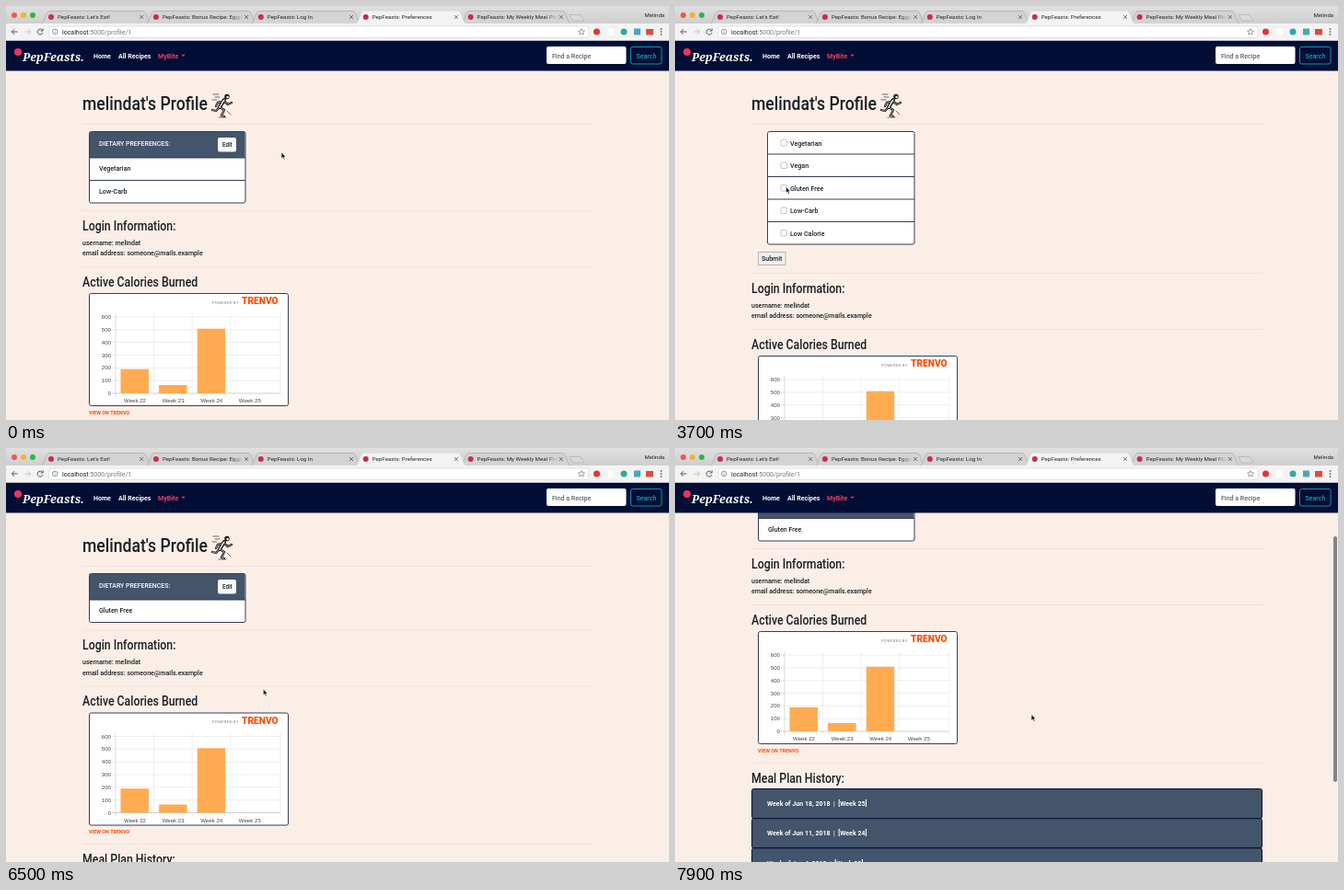
Animation, 720 px wide and 450 px high, one loop 8 s. Source, as an HTML page:

```html
<!DOCTYPE html>
<html lang="en">
<head>
<meta charset="utf-8">
<title>Profile page</title>
<style>
html, body { margin: 0; width: 100%; height: 100%; overflow: hidden; background: #faeee7; }
svg { display: block; }
text { font-family: Roboto, sans-serif; white-space: pre; }
.axes text { font-family: "Liberation Sans", sans-serif; }
.script { font: italic 600 12.5px "Noto Serif", serif; }
</style>
</head>
<body>
<svg id="stage" width="720" height="450" viewBox="0 0 720 450"></svg>
<script>
const INK = '#1b1f23', SLATE = '#44546a', NAVY = '#020e35', EDGE = '#343f52', ORANGE = '#fc4c02';
const BRAND = 'PepFeasts', USER = 'melindat';
const bold = 'font-weight="700"', medium = 'font-weight="500"';
const outline = `stroke="${EDGE}" rx="2"`;

const text = (x, y, size, str, fill = INK, extra = '') =>
  `<text x="${x}" y="${y}" font-size="${size}" fill="${fill}" ${extra}>${str}</text>`;
// The page's face is a condensed cut, so the whole face shares one ratio.
const cond = (x, y, size, str, fill = INK, extra = medium) =>
  `<g transform="translate(${x} ${y}) scale(.88 1)">${text(0, 0, size, str, fill, extra)}</g>`;
const rect = (x, y, w, h, fill, extra = '') =>
  `<rect x="${x}" y="${y}" width="${w}" height="${h}" fill="${fill}" ${extra}/>`;
const path = (d, stroke, width = 1, fill = 'none') =>
  `<path d="${d}" stroke="${stroke}" stroke-width="${width}" fill="${fill}"/>`;
const dot = (x, y, r, fill) => `<circle cx="${x}" cy="${y}" r="${r}" fill="${fill}"/>`;
const rule = y => path(`M83 ${y}H638`, '#f0e2da');

function runner() {
  const limbs = 'M236 103L232 110L237 113L234 119L237 120M232 110L228 114L224 113M236 103L241 107L245 105M235 104L230 105L228 109';
  const body = 'M237 102L232 110';
  return `<g stroke-linecap="round" stroke-linejoin="round">
    ${path(limbs, '#111', 2.3)}${path(body, '#111', 4)}
    ${path(limbs, '#faeee7', .6)}${path(body, '#faeee7', 1.4)}
    ${path('M225 96H231M227 99H232M224 102H229M240 114L244 118M231 121H239', '#333', .7)}</g>` +
    dot(240, 98.5, 2.7, '#111') + dot(240.6, 99, 1.3, '#faeee7');
}

function prefsCard(items) {
  const rows = items.map((name, i) =>
    (i ? path(`M90.5 ${165 + i * 24.5}H260`, EDGE) : '') + cond(101, 179.2 + i * 24.5, 8.1, name));
  return rect(90.5, 136.5, 169.5, 28.5 + items.length * 24.5, '#fff', outline) +
    rect(91, 137, 168.5, 28, SLATE) + path('M90.5 165H260', EDGE) +
    cond(101, 151.5, 7.9, 'DIETARY PREFERENCES:', '#fff') +
    rect(230, 143, 20, 15.5, '#f8f9fa', 'rx="2"') + cond(235, 153.3, 7, 'Edit') +
    rows.join('');
}

function prefsForm() {
  const rows = ['Vegetarian', 'Vegan', 'Gluten Free', 'Low-Carb', 'Low Calorie'].map((name, i) => {
    const y = 136.5 + i * 24.5;
    return (i ? path(`M100.5 ${y}H260`, EDGE) : '') +
      rect(115, y + 9, 6.5, 6.5, '#fff', 'stroke="#b5b5b5" stroke-width=".8" rx="1.2"') +
      cond(125, y + 15.2, 8.1, name);
  });
  return rect(100.5, 136.5, 159.5, 122.5, '#fff', outline) + rows.join('') +
    `<g id="tick">${rect(114.7, 194.5, 7.2, 7.2, '#1a7fe0', 'rx="1.3"')}
      ${path('M116.3 198.2L117.8 199.8L120.4 196.2', '#fff', 1.1)}</g>` +
    rect(90.5, 267.5, 29.5, 14, '#efefef', 'stroke="#a9a9a9" stroke-width=".8"') +
    cond(94, 277.3, 8, 'Submit');
}

function chart() {
  const y = v => 421 - v * 83 / 600, step = 41.6;
  let axes = '';
  for (let v = 0; v <= 600; v += 100)
    axes += path(`M115 ${y(v)}H298`, v ? '#e8e8e8' : '#bbb', .7) +
      text(114, y(v) + 2.1, 6.1, v, '#444', 'text-anchor="end"');
  for (const x of [119, 119 + step, 119 + 2 * step, 119 + 3 * step, 298])
    axes += path(`M${x} 334V425`, x === 119 ? '#ccc' : '#e8e8e8', .7);
  [190, 65, 508, 0].forEach((v, i) => {
    const x = 119 + i * step;
    axes += rect(x + 5.5, y(v), 30.5, 421 - y(v), '#ffab52') +
      text(x + 21, 431.4, 6.1, 'Week ' + (22 + i), '#444', 'text-anchor="middle"');
  });
  return rect(90.5, 312.5, 216, 122, '#fff', outline) +
    text(224, 323.5, 4, 'POWERED BY', '#777', 'letter-spacing=".45"') +
    text(256, 324, 10.2, 'TRENVO', ORANGE, 'font-weight="900"') +
    `<g class="axes">${axes}</g>`;
}

function details() {
  const weeks = ['18', '11', '4'].map((day, i) => {
    const y = 483.5 + i * 32.2;
    return rect(83.5, y, 554, 32.2, SLATE, `stroke="${NAVY}" rx="2"`) +
      cond(100, y + 18.7, 8, `Week of Jun ${day}, 2018  |  [Week ${25 - i}]`, '#fff', bold);
  });
  return rule(222.5) + cond(83, 243.5, 14, 'Login Information:') +
    cond(83, 259.5, 8.1, 'username: ' + USER) +
    cond(83, 271.4, 8.1, 'email address: someone@mails.example') +
    rule(283.5) + cond(83, 304.5, 14, 'Active Calories Burned') + chart() +
    cond(90, 443.5, 6.2, 'VIEW ON TRENVO', ORANGE, bold) +
    rule(455) + cond(83, 476.5, 14, 'Meal Plan History:') + weeks.join('');
}

function browser() {
  const tabs = ["Let's Eat!", 'Bonus Recipe: Eggplant', 'Log In', 'Preferences', 'My Weekly Meal Plans'];
  const tab = i => {
    const x = 38 + 113.9 * i, on = i === 3, fill = on ? '#f3f3f3' : '#d3d3d3';
    return path(`M${x} 19.5C${x + 4} 19 ${x + 5} 5.5 ${x + 9} 5.5H${x + 111}C${x + 115} 5.5 ${x + 116} 19 ${x + 120} 19.5`,
      on ? '#e2e2e2' : '#aaa', .7, fill) +
      dot(x + 11, 12, 3, '#c92c4d') +
      `<svg x="${x + 18}" y="0" width="87" height="19">${text(0, 14.1, 6.2, `${BRAND}: ${tabs[i]}`, '#222')}
        ${on ? '' : rect(75, 6, 12, 12, 'url(#fade)')}</svg>` +
      path(`M${x + 107.2} 10l4 4m0-4l-4 4`, '#555', .8);
  };
  return rect(0, 0, 720, 20, 'url(#strip)') + [0, 1, 2, 4, 3].map(tab).join('') +
    path('M612 9.5H624L627.5 16H615.5Z', '#aaa', .6, '#d9d9d9') +
    dot(9, 10, 3, '#f5554f') + dot(19, 10, 3, '#f6b02c') + dot(29, 10, 3, '#2bb941') +
    text(693.5, 12.3, 6.1, 'Melinda', '#222') +
    rect(0, 19, 720, 18.5, '#f3f3f3') +
    rect(47, 22, 586, 12.5, '#fff', 'rx="2" stroke="#d0d0d0" stroke-width=".6"') +
    path('M12.5 28H6.5M9 25.2L6.2 28L9 30.8', '#555', 1) +
    path('M20.5 28H26.5M24 25.2L26.8 28L24 30.8', '#c4c4c4', 1) +
    path('M39.6 26.4A3 3 0 1 0 40 29M40.2 24.5V27H37.7', '#555', 1) +
    path('M56 28a2.8 2.8 0 1 1-5.6 0a2.8 2.8 0 1 1 5.6 0M53.2 27.7V29.6M53.2 26.2V26.9', '#666', .7) +
    text(61, 30.5, 7, 'localhost<tspan fill="#777">:5000/profile/1</tspan>', '#222') +
    path('M625 24.6l1 2.3 2.5.2-1.9 1.6.6 2.4-2.2-1.3-2.2 1.3.6-2.4-1.9-1.6 2.5-.2z', '#666', .6) +
    dot(641.5, 28, 3.5, '#e3342f') + rect(653, 24.5, 7, 7, '#fff') +
    dot(671, 28, 3.5, '#2fa8a0') + rect(682, 24.5, 7, 7, '#4aa5bd') + rect(695, 25, 8, 6.5, '#df4b3f') +
    [25, 28, 31].map(y => dot(711.5, y, .9, '#666')).join('');
}

function navbar() {
  return rect(0, 37.5, 720, 33, NAVY) + dot(13, 50, 4, '#f0325c') +
    `<text class="script" x="18" y="59.5" fill="#fff">${BRAND}.</text>` +
    cond(95, 56.7, 8, 'Home', '#fff', bold) + cond(122, 56.7, 8, 'All Recipes', '#fff', bold) +
    cond(165, 56.7, 8, 'MyBite', '#f23d5c', bold) + path('M190.5 52.8H194.7L192.6 55Z', 'none', 0, '#f23d5c') +
    rect(587, 44, 86.5, 19, '#fff', 'rx="2"') + cond(593, 56.5, 8, 'Find a Recipe', '#5c636a') +
    rect(678.5, 44.5, 33.5, 18.5, 'none', 'rx="2" stroke="#17a2b8" stroke-width=".9"') +
    cond(684.5, 56.5, 8, 'Search', '#17a2b8');
}

const $ = id => document.getElementById(id);
$('stage').innerHTML = `
  <defs>
    <linearGradient id="fade">
      <stop offset="0" stop-color="#d3d3d3" stop-opacity="0"/><stop offset="1" stop-color="#d3d3d3"/>
    </linearGradient>
    <linearGradient id="strip" x2="0" y2="1">
      <stop offset="0" stop-color="#e0e0e0"/><stop offset="1" stop-color="#cdcdcd"/>
    </linearGradient>
  </defs>
  ${rect(0, 0, 720, 450, '#faeee7')}
  <g id="page">${cond(83, 112.5, 20, USER + "'s Profile")}${runner()}${rule(128.5)}
    <g id="card0">${prefsCard(['Vegetarian', 'Low-Carb'])}</g>
    <g id="card1">${prefsForm()}</g>
    <g id="card2">${prefsCard(['Gluten Free'])}</g>
    <g id="details">${details()}</g></g>
  <g id="bar">${rect(715, 37, 4, 267, '#858383', 'rx="2"')}</g>
  ${navbar()}${browser()}
  <g id="mouse">${path('M0 0V6.8L1.6 5.4L2.8 8L4 7.5L2.8 5H4.9Z', '#fff', .6, '#111')}</g>`;

// Tracks are rows of [time, ...values]
const mousePath = [[0, 299, 159], [500, 299, 159], [1200, 243, 151], [2600, 243, 151], [3400, 120.5, 196.5],
  [4300, 120.5, 196.5], [5300, 108, 272], [5900, 108, 272], [6450, 275.5, 261], [6900, 387, 289.5]];
const scrollPath = [[6900, 0], [7500, 57], [7900, 88.5]];

function sample(track, t, col) {
  const i = track.findIndex(k => k[0] > t);
  if (i === 0) return track[0][col];
  if (i < 0) return track[track.length - 1][col];
  const a = track[i - 1], b = track[i], u = (t - a[0]) / (b[0] - a[0]);
  const e = track === mousePath ? u * u * (3 - 2 * u) : u;
  return a[col] + (b[col] - a[col]) * e;
}

const move = (id, x, y) => $(id).setAttribute('transform', `translate(${x} ${y})`);
const show = (id, on) => $(id).setAttribute('visibility', on ? 'visible' : 'hidden');

function draw() {
  const t = Math.floor(performance.now() % 8000 / 100) * 100;
  const mode = t < 1500 ? 0 : t < 5900 ? 1 : 2, scroll = sample(scrollPath, t, 1);
  for (let i = 0; i < 3; i++) show('card' + i, i === mode);
  show('tick', mode === 1 && t >= 4000);
  show('bar', scroll > 0);
  move('details', 0, [0, 68, -24.5][mode]);
  move('page', 0, -scroll);
  move('bar', 0, scroll * 2 / 3);
  move('mouse', sample(mousePath, t, 1), sample(mousePath, t, 2));
  requestAnimationFrame(draw);
}
draw();
</script>
</body>
</html>
```
